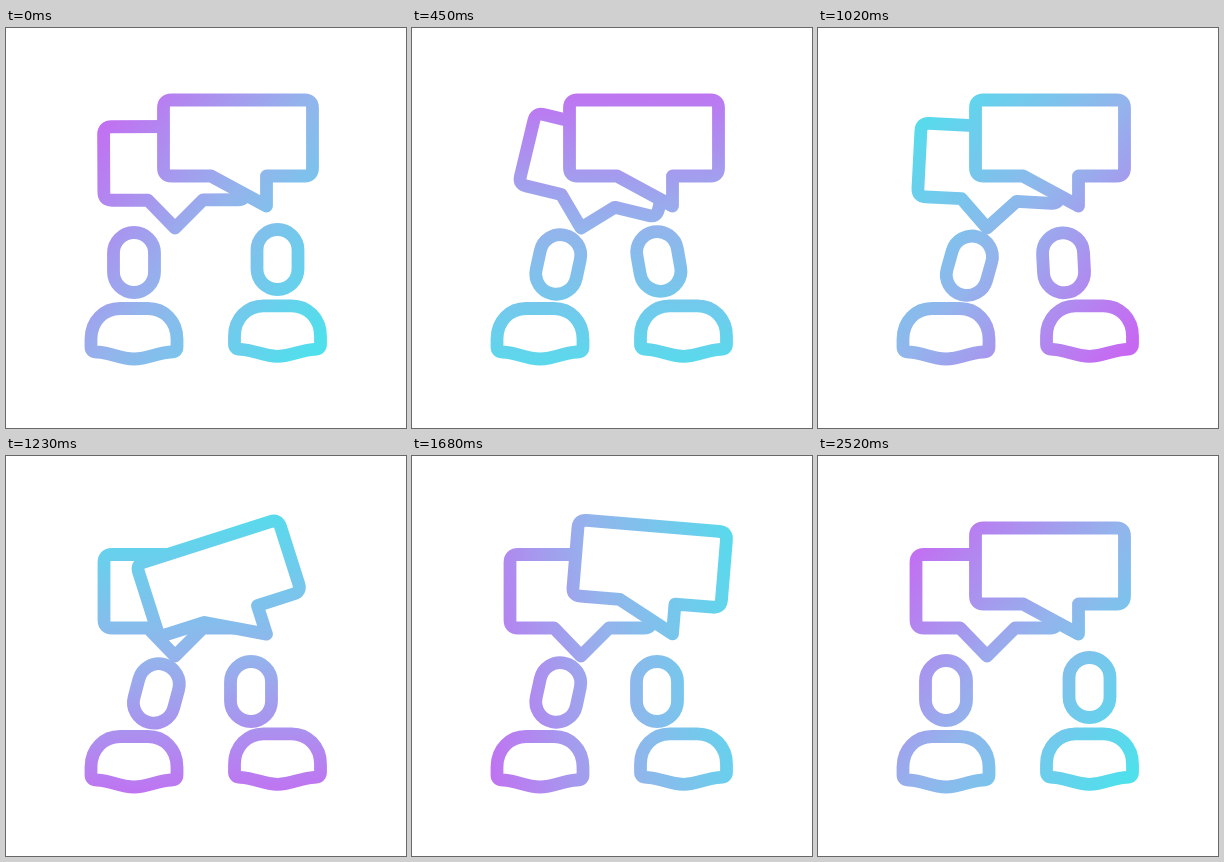
These frames come from a looping animation (400 by 400 pixels, 4.55 s). An HTML page with a canvas:

```html
<!DOCTYPE html>
<html lang="en">
<head>
<meta charset="utf-8">
<title>Conversation</title>
<style>
html, body { margin: 0; height: 100%; overflow: hidden; background: #fff; }
canvas { display: block; width: 100vw; height: 100vh; }
</style>
</head>
<body>
<canvas width="400" height="400"></canvas>
<script>
const ctx = document.querySelector('canvas').getContext('2d');
const LOOP = 4550, MOVING = 2520;

const progress = (t, from, to) => Math.min(1, Math.max(0, (t - from) / (to - from)));
const smooth = u => u * u * (3 - 2 * u);
const ease = (t, from, to) => smooth(progress(t, from, to));
const bump = (t, from, to) => Math.sin(Math.PI * progress(t, from, to)) ** 2;

// Swing that dies out evenly.
function wobble(t) {
  const u = progress(t, 0, 1180);
  return -22 * (1 - u) * Math.sin(Math.PI * u * 4);
}

// Shapes are drawn around their own pivots.
const backBubble = new Path2D(`M-63 -101.5H63Q71 -101.5 71 -93.5V-36Q71 -28 63 -28
  H28L0 0L-27 -28H-63Q-71 -28 -71 -36V-93.5Q-71 -101.5 -63 -101.5Z`);
const frontBubble = new Path2D(`M-95.5 -106H37.5Q45.5 -106 45.5 -98V-38Q45.5 -30 37.5 -30
  H-.5V0L-56 -30H-95.5Q-103.5 -30 -103.5 -38V-98Q-103.5 -106 -95.5 -106Z`);
const head = new Path2D();
head.roundRect(-20.5, -30, 41, 60, 20.5);
const body = new Path2D(`M-43 -12V-20C-43 -38 -30 -50.5 -14 -50.5H14
  C30 -50.5 43 -38 43 -20V-12Q43 -7 37 -7C21 -6 15 0 0 0S-21 -6 -37 -7Q-43 -7 -43 -12Z`);

function draw(shape, x, y, { angle = 0, squash = 0, shift = 0, fill = false } = {}) {
  const m = new DOMMatrix().translate(x, y).rotate(angle)
    .scale(1 + squash, 1 - squash).translate(0, shift);
  const path = new Path2D();
  path.addPath(shape, m);
  if (fill) ctx.fill(path);
  ctx.stroke(path);
}

function ink(t) {
  const turn = smooth(1 - (1 - progress(t, 0, MOVING)) ** 1.35);
  const a = (38 + 360 * turn) * Math.PI / 180;
  const dx = Math.cos(a) * 162, dy = Math.sin(a) * 162;
  const gradient = ctx.createLinearGradient(200 - dx, 200 - dy, 200 + dx, 200 + dy);
  ['#c768f2', '#93b4ec', '#4fe0ec'].forEach((c, i) => gradient.addColorStop(i * .5, c));
  return gradient;
}

function paint(t) {
  ctx.fillStyle = '#fff';
  ctx.fillRect(0, 0, 400, 400);
  ctx.strokeStyle = ink(t);
  ctx.lineWidth = 12.8;
  ctx.lineJoin = 'round';

  draw(backBubble, 169, 200, { angle: wobble(t) });
  draw(frontBubble, 261, 178, { angle: wobble(t - 1130), fill: true });

  const meet = ease(t, 0, 400), jolt = .04 * bump(t, 0, 400);

  // Left person leans in, then straightens up.
  const lean = 12.2 * (meet - ease(t, 2030, 2460)) + 3.5 * bump(t, 450, 1650);
  const leftSquash = jolt + .05 * bump(t, 2000, 2360);
  draw(body, 128, 331, { squash: leftSquash });
  draw(head, 128, 321, { angle: lean, squash: leftSquash, shift: -86.5 });

  // Right person slides over, tips the head, then slides back.
  const slide = meet - ease(t, 1740, 2180);
  const tip = meet - ease(t, 800, 1150);
  const rightSquash = jolt + .035 * bump(t, 1800, 2170);
  draw(body, 271.5, 328.3, { squash: rightSquash });
  draw(head, 271.5 - 26.5 * slide + 7 * tip, 261.5 + 4 * slide - 2.5 * tip,
    { angle: -10 * tip, squash: rightSquash, shift: -30 });
}

function frame() {
  paint(performance.now() % LOOP);
  requestAnimationFrame(frame);
}
frame();
</script>
</body>
</html>
```
